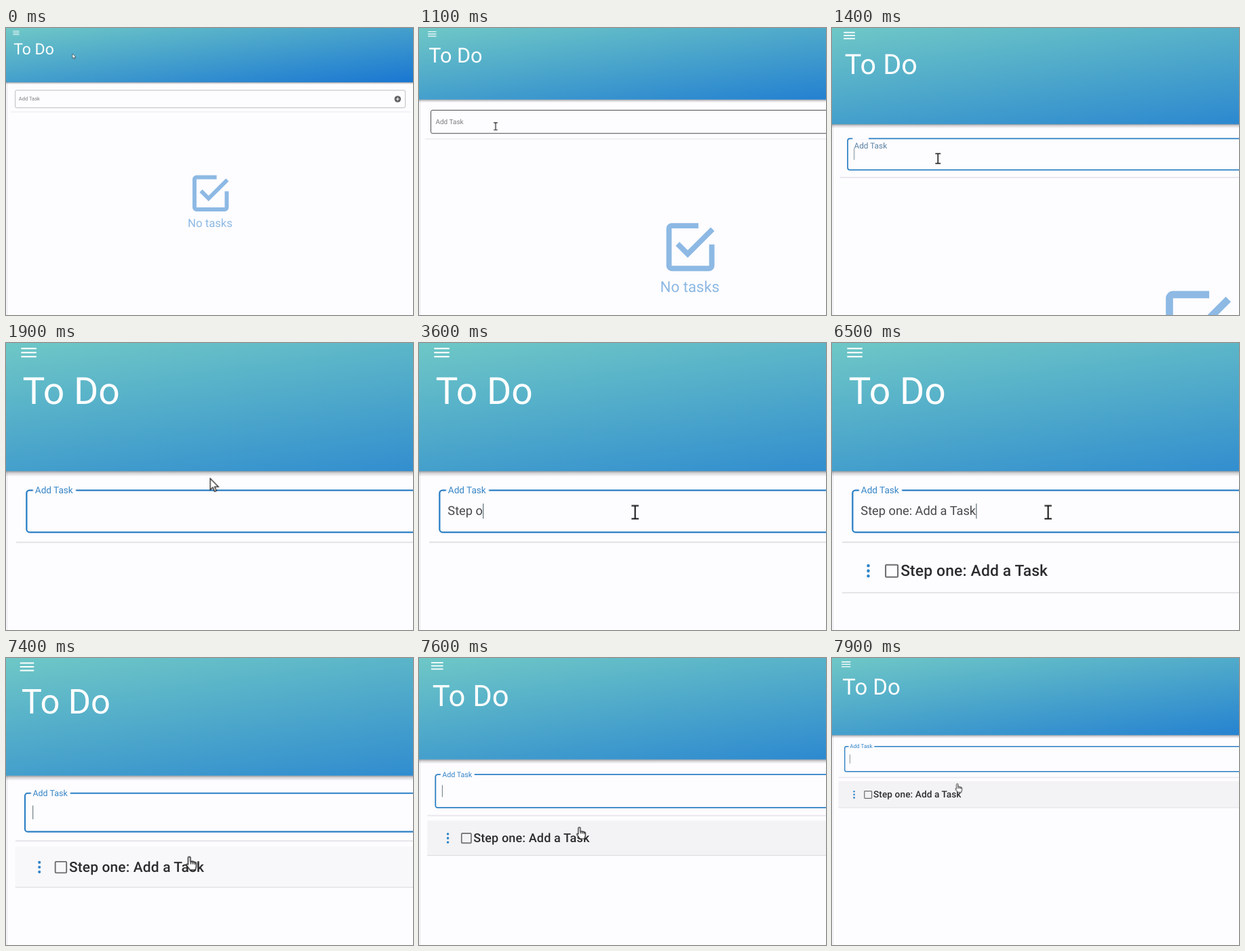
An HTML page that plays this animation: 600x424 px, repeating every 8 s.

```html
<!DOCTYPE html>
<html lang="en">
<head>
<meta charset="utf-8">
<title>To Do</title>
<style>
  html, body { margin: 0; width: 100%; height: 100%; overflow: hidden; background: #fdfcff; }
  svg { display: block; width: 600px; height: 424px; font-family: Roboto, sans-serif; text-rendering: geometricPrecision; }

  .anim { animation: 8s linear infinite; }
  .step { animation: 8s step-end infinite; }
  #zoom { animation-name: zoom; }
  #pointer { animation-name: move; animation-timing-function: ease-in-out; }
  #arrow { animation-name: arrow; }
  #beam { animation-name: beam; }
  #hand { animation-name: hand; }
  #field { animation-name: field; }
  #notch { animation-name: notch; transform-box: fill-box; transform-origin: 0 0; }
  #label { animation-name: label; }
  #empty { animation-name: empty; }
  #task { animation-name: task; }
  #hover { animation-name: hover; }
  #typed { white-space: pre; }

  @keyframes zoom {
    0%, 11.125% { transform: translate(0, 0) scale(1); }
    22.375%, 90.9% { transform: translate(-2.3px, -3.2px) scale(2.4); }
    100% { transform: translate(-.46px, -.64px) scale(1.28); }
  }
  @keyframes move {
    0%, 1.25% { transform: translate(98px, 38px); }
    11%, 16.25% { transform: translate(85.4px, 109.9px); }
    23.75% { transform: translate(126.4px, 84.7px); }
    31.25%, 83.75% { transform: translate(133.7px, 105.5px); }
    92.5% { transform: translate(123.6px, 134.6px); }
    98.75%, 100% { transform: translate(129.5px, 130.4px); }
  }
  @keyframes arrow {
    0%, 21.5%, 87.5% { visibility: visible; }
    8.1%, 26%, 90.5%, 100% { visibility: hidden; }
  }
  @keyframes beam {
    0%, 21.5%, 87.5%, 100% { visibility: hidden; }
    8.1%, 26% { visibility: visible; }
  }
  @keyframes hand {
    0% { visibility: hidden; }
    90.5%, 100% { visibility: visible; }
  }
  @keyframes field {
    0% { stroke: #a9a9ac; stroke-width: .75px; }
    8.1% { stroke: #4c4c4e; stroke-width: .75px; }
    16.25%, 100% { stroke: #2b7fc4; stroke-width: .95px; }
  }
  @keyframes notch {
    0%, 16.25% { transform: scaleX(0); }
    18.75%, 100% { transform: scaleX(1); }
  }
  @keyframes label {
    0%, 16.25% { transform: translate(18.8px, 107.2px) scale(1); fill: #7d7d80; }
    18.75%, 100% { transform: translate(18.8px, 93.8px) scale(.75); fill: #3485c6; }
  }
  @keyframes empty {
    0% { visibility: visible; }
    81.2%, 100% { visibility: hidden; }
  }
  @keyframes task {
    0% { visibility: hidden; }
    81.2%, 100% { visibility: visible; }
  }
  @keyframes hover {
    0%, 91.5% { opacity: 0; }
    93.5%, 100% { opacity: 1; }
  }
</style>
</head>
<body>
<svg viewBox="0 0 600 424">
  <defs>
    <linearGradient id="sky" x2="1" y2="1">
      <stop stop-color="#6fc8c6"/>
      <stop offset="1" stop-color="#1976d2"/>
    </linearGradient>
    <linearGradient id="shade" x2="0" y2="1">
      <stop stop-color="#000" stop-opacity=".42"/>
      <stop offset=".4" stop-color="#000" stop-opacity=".16"/>
      <stop offset="1" stop-color="#000" stop-opacity="0"/>
    </linearGradient>
  </defs>

  <path d="M1.5 0V424" stroke="#e6e5ea"/>

  <g id="zoom" class="anim">
    <rect y="80" width="600" height="3.6" fill="url(#shade)"/>
    <rect width="600" height="80.2" fill="url(#sky)"/>
    <path d="M10.3 4.7h9.3M10.3 7.2h9.3M10.3 9.7h9.3" stroke="#fff" stroke-width=".9"/>
    <text x="11.2" y="38.7" font-size="23" fill="#fff">To Do</text>

    <rect id="field" class="step" x="13.6" y="92" width="575" height="25.8" rx="1.8" fill="none"/>
    <rect id="notch" class="anim" x="17.6" y="91" width="26.3" height="2" fill="#fdfcff"/>
    <text id="label" class="anim" font-size="7.55">Add Task</text>
    <text id="typed" x="18.6" y="107.3" font-size="7.6" fill="#48484a"></text>
    <path id="caret" d="M18.9 100.2v9.3" stroke="#5f7078" stroke-width=".5"/>
    <circle cx="577.4" cy="105" r="4.8" fill="#616163"/>
    <path d="M574.9 105h5M577.4 102.5v5" stroke="#fff" stroke-width="1"/>
    <path d="M7.2 124H595.5" stroke="#dedde2" stroke-width=".7"/>

    <g id="empty" class="step" fill="#8db9e4">
      <path transform="translate(266 208.6) scale(2.969)" d="M19 19H5V5h10V3H5a2 2 0 0 0-2 2v14a2 2 0 0 0 2 2h14a2 2 0 0 0 2-2v-8h-2M7.91 10.08 6.5 11.5 11 16 21 6l-1.41-1.42L11 13.17Z"/>
      <text x="301" y="294" font-size="16.7" text-anchor="middle">No tasks</text>
    </g>

    <g id="task" class="step">
      <rect id="hover" class="anim" x="7.2" y="127.8" width="588.3" height="27.2" fill="#f3f2f4"/>
      <path d="M7.2 155.1H595.5" stroke="#dedde2" stroke-width=".6"/>
      <path d="M23.25 138.4h0M23.25 141.6h0M23.25 144.8h0" stroke="#2f84c8" stroke-width="1.9" stroke-linecap="round"/>
      <rect x="33.9" y="137.9" width="7.5" height="7.5" rx=".5" fill="none" stroke="#6c6c6f" stroke-width=".85"/>
      <text x="43.1" y="144.8" font-size="9.5" font-weight="500" letter-spacing=".07" fill="#2c2c2e">Step one: Add a Task</text>
    </g>

    <g id="pointer" class="anim">
      <path id="arrow" class="step" d="M0 0V7L1.6 5.5 2.7 8 3.8 7.5 2.7 5.1H5Z" fill="#fff" stroke="#222" stroke-width=".55"/>
      <path id="beam" class="step" d="M-2.2-4H2.2M-2.2 4H2.2M0-4V4" fill="none" stroke="#161616" stroke-width=".85"/>
      <path id="hand" class="step" d="M-.8.7Q-.8 0 0 0T.8.7V3.2L2 3.1 3.3 3.4 4.7 4.1V6.4L4.1 8.9H.5L-1.8 5.8Q-2.3 4.5-.8 5.2ZM1 3.4V5M2.4 3.4V5M3.7 3.8V5.2" fill="#fff" stroke="#1c1c1c" stroke-width=".65" stroke-linejoin="round"/>
    </g>
  </g>
</svg>
<script>
  const LOOP = 8000, FOCUS = 1300, SUBMIT = 6500, CARET_BACK = 7380, BLINK = 530;
  const text = 'Step one: Add a Task';
  const keys = [2700, 2900, 3000, 3200, 3400, 3500, 3800, 3900, 4100, 4200,
                4400, 4600, 4700, 4900, 5000, 5100, 5700, 5900, 6000, 6200];
  const byId = id => document.getElementById(id);
  const typed = byId('typed'), caret = byId('caret');
  const clock = byId('zoom').getAnimations()[0];

  function caretOn(t, count) {
    if (t < FOCUS) return false;
    if (t >= SUBMIT) return t >= CARET_BACK;
    const last = count ? keys[count - 1] : FOCUS;
    return Math.floor((t - last) / BLINK) % 2 === 0;
  }

  function draw() {
    const t = (clock.currentTime || 0) % LOOP;
    const count = t < SUBMIT ? keys.filter(k => k <= t).length : 0;
    const value = text.slice(0, count);
    if (typed.textContent !== value) typed.textContent = value;
    const x = count ? typed.getComputedTextLength() : 0;
    caret.setAttribute('transform', `translate(${x})`);
    caret.setAttribute('visibility', caretOn(t, count) ? 'visible' : 'hidden');
    requestAnimationFrame(draw);
  }
  draw();
</script>
</body>
</html>
```
